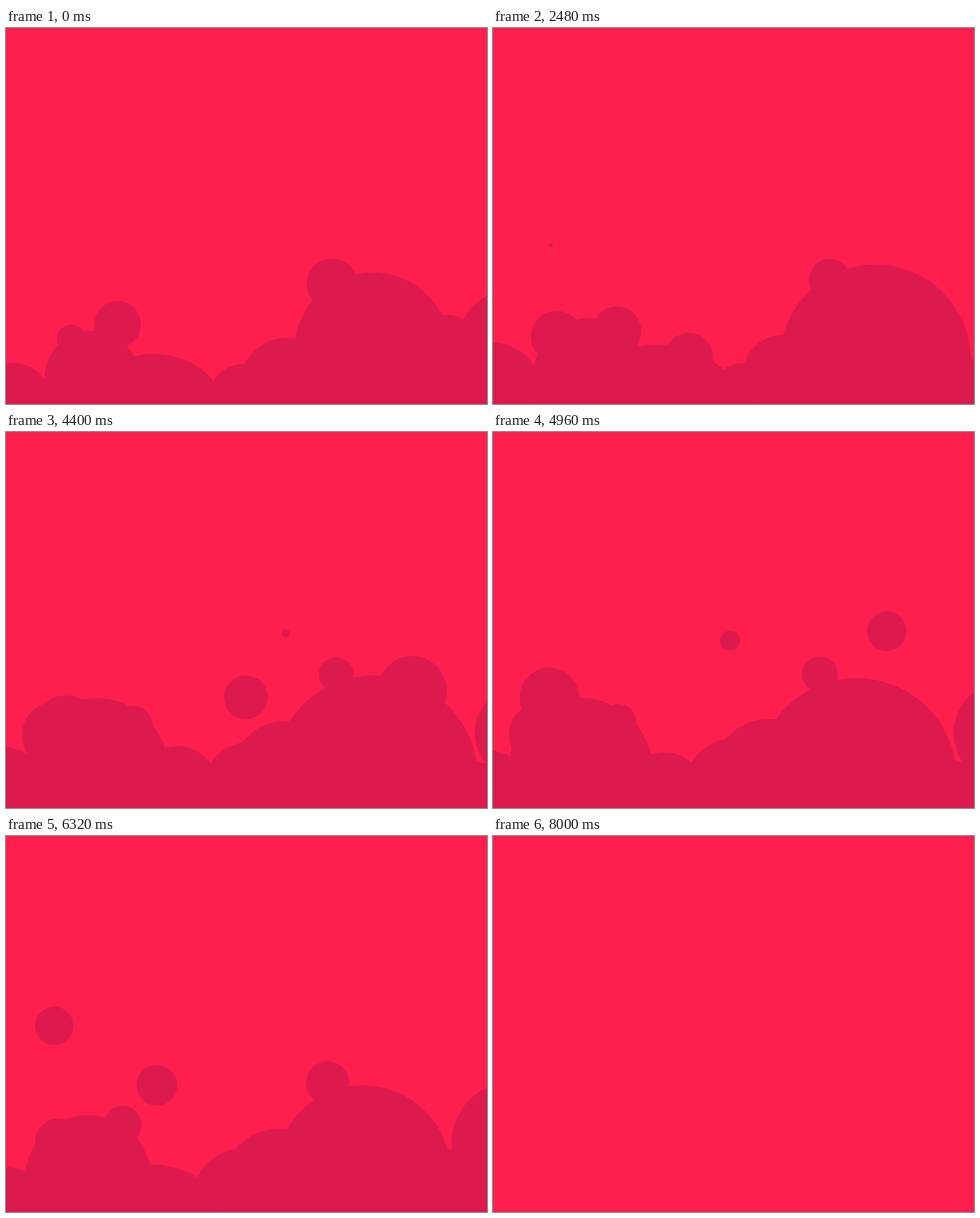
An HTML page that plays this animation: 640x500 px, repeating every 8.04 s.

```html
<!DOCTYPE html>
<html lang="en">
<head>
<meta charset="utf-8">
<title>Bubbling hills</title>
<style>
  html, body { margin: 0; width: 100%; height: 100%; overflow: hidden; background: #ff1f4f; }
  svg { display: block; width: 640px; height: 500px; }
</style>
</head>
<body>
<svg viewBox="0 0 640 500">
  <g id="foam" fill="#dc1a4d"><rect y="475" width="640" height="25"/></g>
</svg>
<script>
const LOOP = 8040, STEP = 40, CYCLE = 8000;
const foam = document.getElementById('foam');
const blobs = [];

// A blob's pose is a function of time that gives [x, y, radius].
function addBlob(pose) {
  const el = document.createElementNS('http://www.w3.org/2000/svg', 'circle');
  foam.append(el);
  blobs.push({ el, pose });
}

// Swings once per cycle around mean; peak is the part of the cycle where it is largest.
const wave = (mean, swing, peak) => time => mean + swing * Math.cos(2 * Math.PI * (time / CYCLE - peak));
const still = value => () => value;

function cell(x, y, r) {
  addBlob(time => [x(time), y(time), r(time)]);
}

// Rises steadily (speeds per second) and shrinks to nothing at (x, y) when time is end.
function bubble({ end, x, y, drift, rise, size, power = 1 }) {
  addBlob(time => {
    const left = Math.max(0, (end - time) / 1000);
    return [x - drift * left, y + rise * left, size * left ** power];
  });
}

// Large mounds
cell(wave(492, 17, .29), wave(444, 17, .58), wave(121, 17, .5));
cell(wave(679, 8, .42), wave(410, 10, .07), wave(63, 18, .82));
cell(wave(119, 10, .33), wave(458, 9, .1), wave(78, 18, .59));
cell(wave(207, 15, .37), wave(550, 12, .6), wave(121, 14, .5));
cell(wave(0, 9, .06), wave(491, 9, .87), wave(61, 9, .5));

// Middle humps
cell(wave(323, 11, .35), wave(487, 12, .15), wave(55, 13, .65));
cell(wave(374, 11, .25), wave(464, 11, 0), wave(64, 14, .74));
cell(still(588), wave(435, 21, .6), wave(32, 8, .15));
cell(still(228), wave(506, 36, 0), still(54));

// Small bumps on top
cell(wave(159.5, 11, .48), wave(393.5, 10, .24), wave(29, 5, .18));
cell(wave(78, 14, .14), wave(409, 6, .1), wave(32, 13, .53));
cell(wave(438, 10, .32), wave(332, 10, .1), wave(28.5, 5.5, .03));

// Resting base
cell(still(620), still(500), still(62));
cell(still(75), still(490), still(24));

bubble({ end: 2640, x: 76, y: 274, drift: -5, rise: 94, size: 18.3 });
bubble({ end: 3960, x: 290, y: 305, drift: 20, rise: 90, size: 22 });
bubble({ end: 4730, x: 357.5, y: 244, drift: -44, rise: 71, size: 16.7 });
bubble({ end: 5436, x: 312, y: 213, drift: -7, rise: 135, size: 28 });
bubble({ end: 5704, x: 502, y: 159.5, drift: -29.5, rise: 141.5, size: 35.3 });
bubble({ end: 7284, x: 56.5, y: 181, drift: -8, rise: 74, size: 26, power: .5 });
bubble({ end: 7400, x: 209, y: 187, drift: 7.5, rise: 134, size: 25 });

function draw(time) {
  foam.style.display = time >= CYCLE ? 'none' : '';
  for (const { el, pose } of blobs) {
    const [x, y, r] = pose(time);
    el.setAttribute('cx', x);
    el.setAttribute('cy', y);
    el.setAttribute('r', r);
  }
}

const start = performance.now();
function tick() {
  const time = (performance.now() - start) % LOOP;
  draw(Math.floor(time / STEP) * STEP);
  requestAnimationFrame(tick);
}
tick();
</script>
</body>
</html>
```
